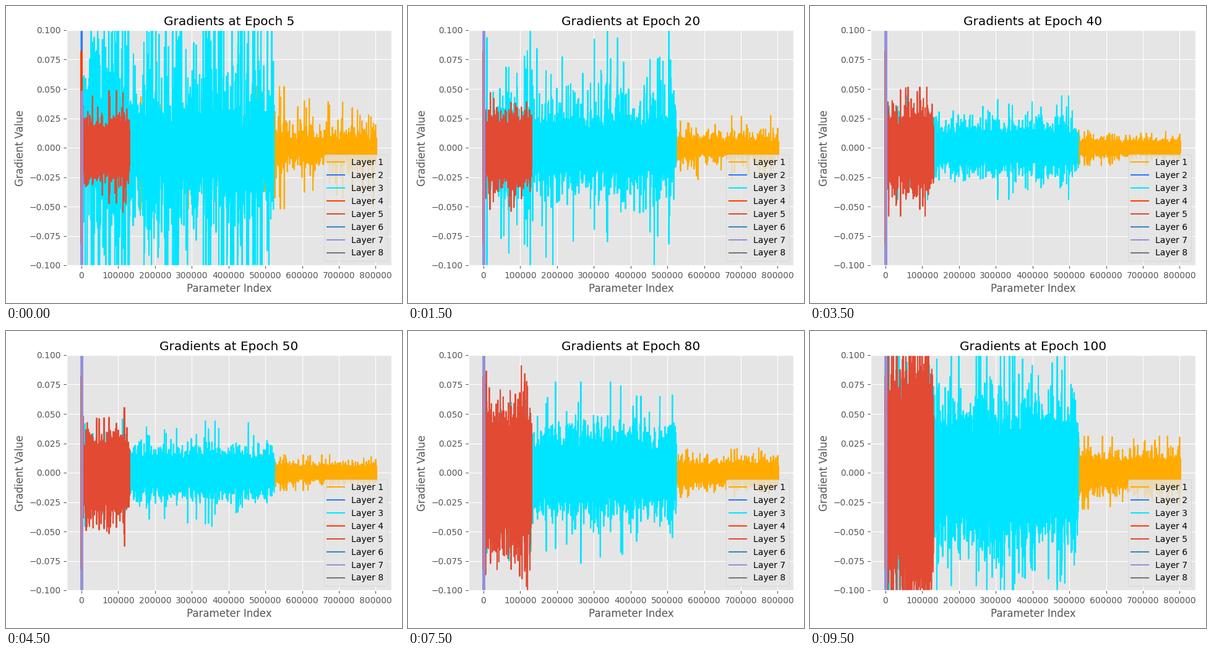
Animation of 640 by 480 pixels, one loop 10000 ms. Source, as a matplotlib script:

```python
import numpy as np
import matplotlib.pyplot as plt
from matplotlib.animation import FuncAnimation

plt.style.use("ggplot")

WIDTH, HEIGHT, DPI = 640, 480, 100
COLORS = ["#FFAB00", "#2979FF", "#00E5FF", "#FF3D00",
          "#E24A33", "#348ABD", "#988ED5", "#777777"]
PARAMETERS = 784 * 1024


def zigzag(x, high, low):
    """Run up and down once at every x."""
    return np.repeat(x, 2), np.column_stack([high, low]).ravel()


def training_phase(epoch):
    """Strength of the first unrest and of the final growth."""
    return np.exp(-((epoch - 5) / 18) ** 2), (epoch / 100) ** 4


def weights(layer, epoch, neurons, inputs, core, tail, skew=1):
    """One swing per neuron; core and tail are (base, early[, late])."""
    early, late = training_phase(epoch)
    size = core[0] * (1 + core[1] * early + core[2] * late)
    spread = tail[0] + tail[1] * early

    steady = np.random.default_rng(layer).standard_normal(neurons)
    rng = np.random.default_rng(1000 * layer + epoch)
    fresh, split = rng.standard_normal((2, neurons))
    z_high = .75 * steady + .66 * fresh
    z_low = .8 * z_high + .6 * split

    def reach(z):
        return size * np.exp(spread * np.minimum(np.abs(z), 2.7))

    x = (np.arange(neurons) + rng.random(neurons)) * inputs
    return zigzag(x, reach(z_high), -skew * reach(z_low))


def stripe(length, high, low):
    x = np.linspace(0, length, 10)
    return zigzag(x, np.full(10, high), np.full(10, low))


def gradients(epoch):
    """Curves by layer number; the other layers stay hidden."""
    return {
        1: weights(1, epoch, 1024, 784, (.0032, .25, 1.2), (.55, .4)),
        2: stripe(1023, .15, -.15),
        3: weights(3, epoch, 512, 1024, (.009, .8, 2.3), (.55, .5)),
        4: stripe(511, .082, -.082),
        5: weights(5, epoch, 256, 512, (.0145, -.2, 2.1), (.45, .08), 1.13),
        7: stripe(2559, .0095 * epoch, -.15),
    }


fig, ax = plt.subplots(figsize=(WIDTH / DPI, HEIGHT / DPI), dpi=DPI)
fig.subplots_adjust(left=98 / WIDTH, right=623 / WIDTH,
                    bottom=1 - 419 / HEIGHT, top=1 - 39 / HEIGHT)
lines = [ax.plot([], [], color=color, label=f"Layer {number}")[0]
         for number, color in enumerate(COLORS, 1)]
ax.set_xlim(-.05 * PARAMETERS, 1.05 * PARAMETERS)
ax.set_ylim(-.1, .1)
ax.set_xlabel("Parameter Index")
ax.set_ylabel("Gradient Value")
ax.legend(loc="lower right")


def update(frame):
    epoch = 5 * (frame + 1)
    ax.set_title(f"Gradients at Epoch {epoch}")
    for layer, curve in gradients(epoch).items():
        lines[layer - 1].set_data(*curve)
    return lines


anim = FuncAnimation(fig, update, frames=20, interval=500,
                     repeat=True, repeat_delay=0)
plt.show()
```
